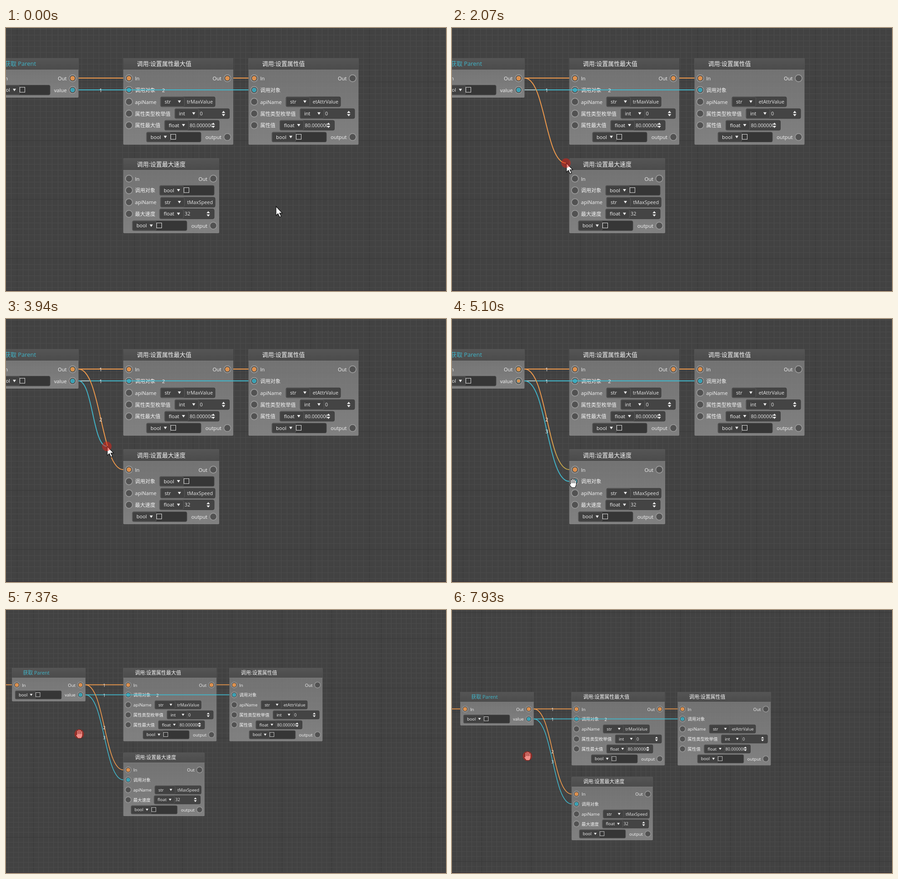
An HTML page with a canvas for the animation above (8000 ms loop, 968 by 578 pixels).

```html
<!DOCTYPE html>
<html lang="zh-CN">
<head>
<meta charset="utf-8">
<title>Node graph</title>
<style>
html, body { margin: 0; width: 100%; height: 100%; overflow: hidden; background: #424242; }
canvas { display: block; }
</style>
</head>
<body>
<canvas id="stage" width="968" height="578"></canvas>
<script>
const W = 968, H = 578, LOOP = 8000, STEP = 70;
const ctx = document.getElementById('stage').getContext('2d');
const FONT = '"Open Sans", "Noto Sans CJK SC", "Noto Sans CJK", "Noto Sans", sans-serif';
const ORANGE = '#f29b4c', BLUE = '#41b6ca';

// Moments at which the state changes
const T = {
  hover: 1170, drag1: 1510, drop1: 2350, link1: 2420, label1: 2620,
  drag2: 3520, drop2: 4420, link2: 4620, zoom: 6490, pan: 7240
};
const ZOOM = 0.8466, ZX = 266, ZY = 360;

const smooth = p => p * p * (3 - 2 * p);
const easeOut = p => 1 - Math.pow(1 - p, 1.25);

// Each move: start time, number of steps, end x, end y, easing
const cursorMoves = [
  [330, 12, 157, 113, smooth],
  [1170, 3, 147, 107, smooth],
  [T.drag1, 12, 270, 332, smooth],
  [2620, 11, 147, 137, easeOut],
  [T.drag2, 12, 267, 366, smooth],
  [T.link2, 7, 266, 361, smooth],
  [6820, 6, 162, 252, smooth],
  [7300, 4, 160, 293, smooth],
  [7580, 6, 166, 321, smooth]
];
const viewMoves = [
  [7300, 4, -2, 32, smooth],
  [7580, 6, 4, 69, smooth]
];

function track(moves, x, y, t) {
  for (const [start, n, tx, ty, ease] of moves) {
    if (t < start) break;
    const p = ease(Math.min(Math.floor((t - start) / STEP) + 1, n) / n);
    x += (tx - x) * p;
    y += (ty - y) * p;
  }
  return { x, y };
}

const between = (t, a, b) => t >= a && t < b;

function text(str, x, y, size = 11.2, color = '#f4f4f4', align = 'left') {
  ctx.font = `${size}px ${FONT}`;
  ctx.fillStyle = color;
  ctx.textAlign = align;
  ctx.fillText(str, x, y);
}

function box(x, y, w, h, r, fill, stroke) {
  ctx.beginPath();
  ctx.roundRect(x, y, w, h, r);
  if (fill) { ctx.fillStyle = fill; ctx.fill(); }
  if (stroke) { ctx.strokeStyle = stroke; ctx.lineWidth = 1; ctx.stroke(); }
}

function disc(x, y, r, fill, stroke, width = 1.6) {
  ctx.beginPath();
  ctx.arc(x, y, r, 0, Math.PI * 2);
  ctx.fillStyle = fill;
  ctx.fill();
  if (stroke) { ctx.strokeStyle = stroke; ctx.lineWidth = width; ctx.stroke(); }
}

function triangle(x, y, w, h) {
  ctx.beginPath();
  ctx.moveTo(x - w / 2, y - h / 2);
  ctx.lineTo(x + w / 2, y - h / 2);
  ctx.lineTo(x, y + h / 2);
  ctx.fillStyle = '#efefef';
  ctx.fill();
}

function pin(x, y, color) {
  disc(x, y, 7.6, '#525252', '#9b9b9b');
  if (color) disc(x, y, 4.2, color === BLUE ? '#3a9fb2' : '#d98f51', color, 1.2);
}

// Type selector with its value field
function field(x, y, type, value) {
  const top = y - 10.7;
  const isBool = type === 'bool', isStr = type === 'str';
  box(x, top, 120, 21.6, 3, isBool ? '#363636' : '#444444', isBool ? '#4b4b4b' : '#3a3a3a');
  box(x + 0.5, top + 0.5, 52, 20.6, 3, '#414141', '#5a5a5a');
  text(type, x + 9, y + 4, 11);
  triangle(x + 41.5, y, 7, 5.5);
  if (isBool) {
    ctx.strokeStyle = '#e4e4e4';
    ctx.lineWidth = 1;
    ctx.strokeRect(x + 53.5, y - 6, 11, 11);
    return;
  }
  ctx.save();
  ctx.beginPath();
  ctx.rect(x + (isStr ? 58 : 54), top, isStr ? 60 : 50.5, 22);
  ctx.clip();
  if (isStr) text(value, x + 115, y + 4, 10.8, '#e6e6e6', 'right');
  else text(value, x + 55, y + 4, 10.8, '#e6e6e6');
  ctx.restore();
  if (!isStr) {
    triangle(x + 107, y - 3.6, 7.5, -4.6);
    triangle(x + 107, y + 3.6, 7.5, 4.6);
  }
}

// Row: y, left label, left pin colour, right label, right pin colour, field
const call = (y, cap) => [y, cap, null, null, null];
const nodes = [
  { x: -31.5, y: 66, w: 191, h: 87, title: '获取 Parent', color: BLUE, rows: t => [
    [110.5, 'In', ORANGE, 'Out', between(t, T.drop1, T.zoom) ? '#dba047' : ORANGE],
    [136.2, null, null, 'value', between(t, T.link2, T.zoom) ? '#639797' : BLUE, [-23, 'bool']]
  ] },
  { x: 258, y: 66, w: 242, h: 190.5, title: '调用:设置属性最大值', rows: () => [
    [110.5, 'In', ORANGE, 'Out', ORANGE],
    [136.2, '调用对象', BLUE],
    [...call(162, 'apiName'), [340, 'str', 'SetAttrMaxValue']],
    [...call(188, '属性类型枚举值'), [371.5, 'int', '0']],
    [...call(213.8, '属性最大值'), [349, 'float', '80.000000']],
    [239.6, null, null, 'output', null, [309, 'bool']]
  ] },
  { x: 533.5, y: 66, w: 242, h: 190.5, title: '调用:设置属性值', rows: () => [
    [110.5, 'In', ORANGE, 'Out', null],
    [136.2, '调用对象', BLUE],
    [...call(162, 'apiName'), [616, 'str', 'SetAttrValue']],
    [...call(188, '属性类型枚举值'), [647, 'int', '0']],
    [...call(213.8, '属性值'), [602.5, 'float', '80.000000']],
    [239.6, null, null, 'output', null, [585, 'bool']]
  ] },
  { x: 258, y: 286.5, w: 211, h: 164.5, title: '调用:设置最大速度', rows: t => [
    [331, 'In', t >= T.drop1 ? ORANGE : null, 'Out', null],
    [356.8, '调用对象', t >= T.link2 ? BLUE : null, null, null, t < T.link2 && [338, 'bool']],
    [...call(382.8, 'apiName'), [340, 'str', 'SetMaxSpeed']],
    [...call(408.4, '最大速度'), [338, 'float', '32']],
    [434.4, null, null, 'output', null, [278, 'bool']]
  ] }
];

function drawNode({ x, y, w, h, title, color, rows }, t) {
  const body = ctx.createLinearGradient(0, y, 0, y + h);
  body.addColorStop(0, 'rgba(128,128,128,.74)');
  body.addColorStop(1, 'rgba(148,148,148,.76)');
  box(x, y, w, h, 2, body);
  const head = ctx.createLinearGradient(0, y, 0, y + 26);
  head.addColorStop(0, '#555555');
  head.addColorStop(1, '#4b4b4b');
  box(x, y, w, 25.5, [2, 2, 0, 0], head);
  ctx.fillStyle = '#7d7d7d';
  ctx.fillRect(x, y + 26, w, 1);
  text(title, x + (color ? 28.5 : 30), y + 17.3, 12.95, color || '#f4f4f4');

  for (const [py, left, leftPin, right, rightPin, f] of rows(t)) {
    if (left) {
      pin(x + 12.5, py, leftPin);
      text(left, x + 25.7, py + 4.6);
    }
    if (right) {
      pin(x + w - 13, py, rightPin);
      text(right, x + w - 26, py + 4.6, 11.2, '#f4f4f4', 'right');
    }
    if (f) field(f[0], py, f[1], f[2]);
  }
}

function wire(x1, y1, x2, y2, color, width = 1.9) {
  const d = Math.abs(x2 - x1) / 2;
  ctx.beginPath();
  ctx.moveTo(x1, y1);
  ctx.bezierCurveTo(x1 + d, y1, x2 - d, y2, x2, y2);
  ctx.strokeStyle = color;
  ctx.lineWidth = width;
  ctx.stroke();
}

const tag = (n, x, y) => text(n, x, y + 4.3, 11.2, '#f4f4f4', 'center');

// The first new wire turns yellowish at its end after the second drag
function linkColor(t) {
  if (!between(t, T.drop2, T.zoom)) return ORANGE;
  const fade = ctx.createLinearGradient(0, 221, 0, 331);
  fade.addColorStop(0, ORANGE);
  fade.addColorStop(1, '#c5a94b');
  return fade;
}

function drawWires(t, cur) {
  const execY = 110, valueY = 136;
  wire(-300, execY, -31.5, execY, ORANGE);
  wire(159.5, execY, 258, execY, ORANGE);
  wire(500, execY, 533.5, execY, ORANGE);
  wire(159.5, valueY, 533.5, valueY, BLUE);
  if (between(t, T.hover, T.zoom)) wire(160, valueY, 183, valueY, '#c4cdcd', 1.6);

  if (t >= T.link1) wire(159.5, execY, 258, 331, linkColor(t));
  else if (t >= T.drag1) wire(159.5, execY, cur.x, cur.y, ORANGE);
  if (t >= T.link2) wire(159.5, valueY, 258, 356.8, BLUE);
  else if (t >= T.drag2) wire(159.5, valueY, cur.x, cur.y, BLUE);

  tag('1', 208.5, 136.7);
  tag('2', 346.5, 136.7);
  if (t >= T.label1) tag('1', 208.5, 111);
  if (t >= T.link1) tag('2', 208.5, 221);
  if (t >= T.link2) tag('3', 208.5, 247);
}

function drawGrid(scale, toX, toY) {
  ctx.fillStyle = '#424242';
  ctx.fillRect(0, 0, W, H);
  const gap = 12.92 * scale;
  const lines = (origin, size, put) => {
    for (let i = Math.ceil(-origin / gap); origin + i * gap < size; i++) {
      ctx.fillStyle = i % 10 ? '#4b4b4b' : '#393939';
      put(Math.round(origin + i * gap));
    }
  };
  lines(toX(282), W, x => ctx.fillRect(x, 0, 1, H));
  lines(toY(118), H, y => ctx.fillRect(0, y, W, 1));
}

const arrowPath = new Path2D('M1 0V20L5.4 16L9 23.6L12.4 22L8.9 14.8H14.8Z');

function drawArrow() {
  ctx.fillStyle = '#fff';
  ctx.strokeStyle = '#151515';
  ctx.lineWidth = 1.3;
  ctx.fill(arrowPath);
  ctx.stroke(arrowPath);
}

function drawHand() {
  const fingers = [[-3.4, -6.6], [-0.4, -8.4], [2.6, -7.6], [5.4, -5]];
  const palm = new Path2D('M-4.6 0H6.6V4L4.4 9H-2.4L-6.8 3.2L-5.8 1.6L-4 3Z');
  const stroke = (x1, y1, x2, y2, color, width) => {
    ctx.beginPath();
    ctx.moveTo(x1, y1);
    ctx.lineTo(x2, y2);
    ctx.strokeStyle = color;
    ctx.lineWidth = width;
    ctx.stroke();
  };
  ctx.lineCap = ctx.lineJoin = 'round';
  ctx.strokeStyle = '#151515';
  ctx.lineWidth = 2;
  ctx.stroke(palm);
  for (const [x, y] of fingers) {
    stroke(x, y, x, 2, '#151515', 4.2);
    stroke(x, y, x, 2, '#fff', 2.3);
  }
  ctx.fillStyle = '#fff';
  ctx.fill(palm);
}

function drawCursor(t, cur) {
  const hand = between(t, 1240, 1580) || between(t, 3250, 3590) ||
    between(t, 4900, 6820) || t >= T.pan;
  const pressed = between(t, T.drag1, T.drop1) || between(t, T.drag2, T.drop2) || t >= T.pan;
  ctx.save();
  ctx.translate(cur.x, cur.y);
  if (hand) drawHand();
  else drawArrow();
  if (pressed) disc(0, 0, 10.5, 'rgba(228,32,20,.5)');
  ctx.restore();
}

function render(t) {
  const cur = track(cursorMoves, 593, 392, t);
  const pan = track(viewMoves, 0, 0, t);
  const scale = t >= T.zoom ? ZOOM : 1;
  const toX = x => ZX + (x - ZX) * scale + pan.x;
  const toY = y => ZY + (y - ZY) * scale + pan.y;

  drawGrid(scale, toX, toY);
  ctx.save();
  ctx.translate(toX(0), toY(0));
  ctx.scale(scale, scale);
  nodes.forEach(n => drawNode(n, t));
  drawWires(t, cur);
  ctx.restore();
  ctx.fillStyle = '#392d36';
  ctx.fillRect(0, H - 1, W, 1);
  drawCursor(t, cur);
}

const begin = performance.now();
function tick() {
  render((performance.now() - begin) % LOOP);
  requestAnimationFrame(tick);
}
tick();
</script>
</body>
</html>
```
